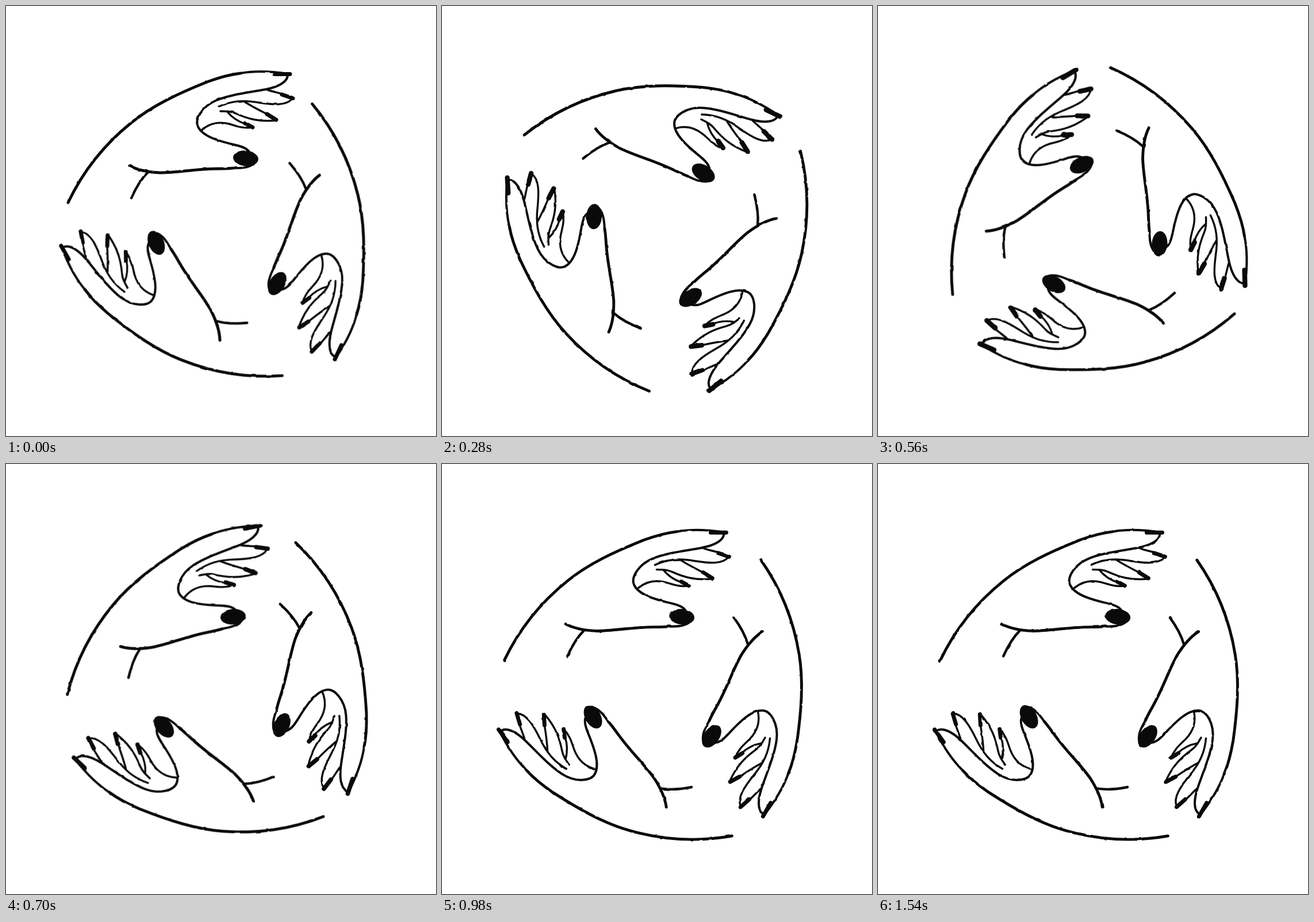
Animation of 748x748 px, one loop 1.61 s. Source, as an HTML page:

```html
<!DOCTYPE html>
<html lang="en">
<head>
<meta charset="utf-8">
<title>Three turning hands</title>
<style>
  html, body { margin: 0; width: 100%; height: 100%; overflow: hidden; background: #fff; }
  svg { display: block; width: 100vw; height: 100vh; }
  #hand { fill: none; stroke: #0a0a0a; stroke-linecap: round; stroke-linejoin: round; }
</style>
</head>
<body>
<svg viewBox="0 0 748 748">
  <defs>
    <filter id="ink" filterUnits="userSpaceOnUse" x="0" y="0" width="748" height="748"
            color-interpolation-filters="sRGB">
      <feTurbulence id="grain" type="fractalNoise" baseFrequency="0.08"/>
      <feDisplacementMap in="SourceGraphic" scale="2.5" xChannelSelector="R" yChannelSelector="G"/>
    </filter>
    <!-- The hand's anchor is near the middle of the thumbnail. -->
    <g id="hand" transform="translate(-417 -267)">
      <path d="M108 342C135 285 172 240 218 203C255 173 300 152 350 132C372 124 390 119 408 117" stroke-width="4.9"/>
      <path d="M408 117C436 112 464 114 490 118" stroke-width="4"/>
      <!-- palm, thumb and wrist -->
      <g transform="translate(0 -2)">
        <path d="M395 284C385 285 378 285 370 285C330 285 300 292 268 292C246 291 230 288 215 280" stroke-width="4.9"/>
        <path d="M247 291C234 304 226 318 218 336" stroke-width="4.4"/>
        <path d="M430 277C420 284 408 284 395 284M490 123C489 135 472 143 452 147C420 153 390 156 366 166C340 177 328 200 334 212C342 229 370 237 400 244C412 247 420 250 424 257" stroke-width="4"/>
        <ellipse cx="417" cy="267" rx="22" ry="13.5" transform="rotate(6 417 267)" fill="#0a0a0a" stroke="none"/>
      </g>
      <!-- the other fingers -->
      <g transform="translate(0 -3)" stroke-width="3.4">
        <path d="M455 149C465 152 473 154 480 156M498 164C488 177 465 175 440 171C412 166 392 168 370 178"/>
        <path d="M414 169C428 178 440 184 454 191M470 202C440 205 420 199 400 190C392 186 383 186 373 186"/>
        <path d="M385 187C394 198 404 204 416 208M430 214C412 217 400 211 388 208C368 203 352 208 339 220"/>
      </g>
      <g id="nails">
        <path d="M467 118.500L494 118.500M480 154L499 160.500M454 188L470 198M416 204L429 211"/>
      </g>
    </g>
  </defs>
  <g id="hands" filter="url(#ink)"></g>
</svg>
<script>
const STEP = 70, STEPS = 23, TURN = 119.6;
const CENTER = { x: 382, y: 385 };

// x, y: anchor relative to the center; bump: mid-turn shift; drift: lasting shift
const hands = [
  { angle: 0,     x: 35,   y: -118, bump: [-18, -3],   drift: [0, -1] },
  { angle: 115,   x: 88,   y: 97,   bump: [16, -17], drift: [10, 25] },
  { angle: 240.5, x: -119, y: 26,   bump: [5, 16],     drift: [-1, -1] },
];

const group = document.getElementById('hands');
const nails = document.getElementById('nails');
const grain = document.getElementById('grain');
for (const hand of hands) {
  hand.node = document.createElementNS('http://www.w3.org/2000/svg', 'use');
  hand.node.setAttribute('href', '#hand');
  group.append(hand.node);
}

// Speeds up for 6 steps, slows down for 7, then rests.
function turnProgress(step) {
  if (step < 6) return 0.488 * (step / 6) ** 2;
  return 1 - 0.512 * (Math.max(0, 13 - step) / 7) ** 2;
}

function draw(step) {
  const p = turnProgress(step);
  const turn = TURN * p;
  const cos = Math.cos(turn * Math.PI / 180), sin = Math.sin(turn * Math.PI / 180);
  const swell = Math.sin(Math.PI * p);
  for (const { node, angle, x, y, bump, drift } of hands) {
    const px = CENTER.x + cos * x - sin * y + bump[0] * swell + drift[0] * p;
    const py = CENTER.y + sin * x + cos * y + bump[1] * swell + drift[1] * p;
    node.setAttribute('transform', `translate(${px} ${py}) rotate(${angle + turn})`);
  }
  nails.setAttribute('stroke-width', 7 + 2 * swell);
  grain.setAttribute('seed', step + 1);
}

let shown = -1;
function tick() {
  const step = Math.floor(performance.now() / STEP) % STEPS;
  if (step !== shown) draw(shown = step);
  requestAnimationFrame(tick);
}
tick();
</script>
</body>
</html>
```
